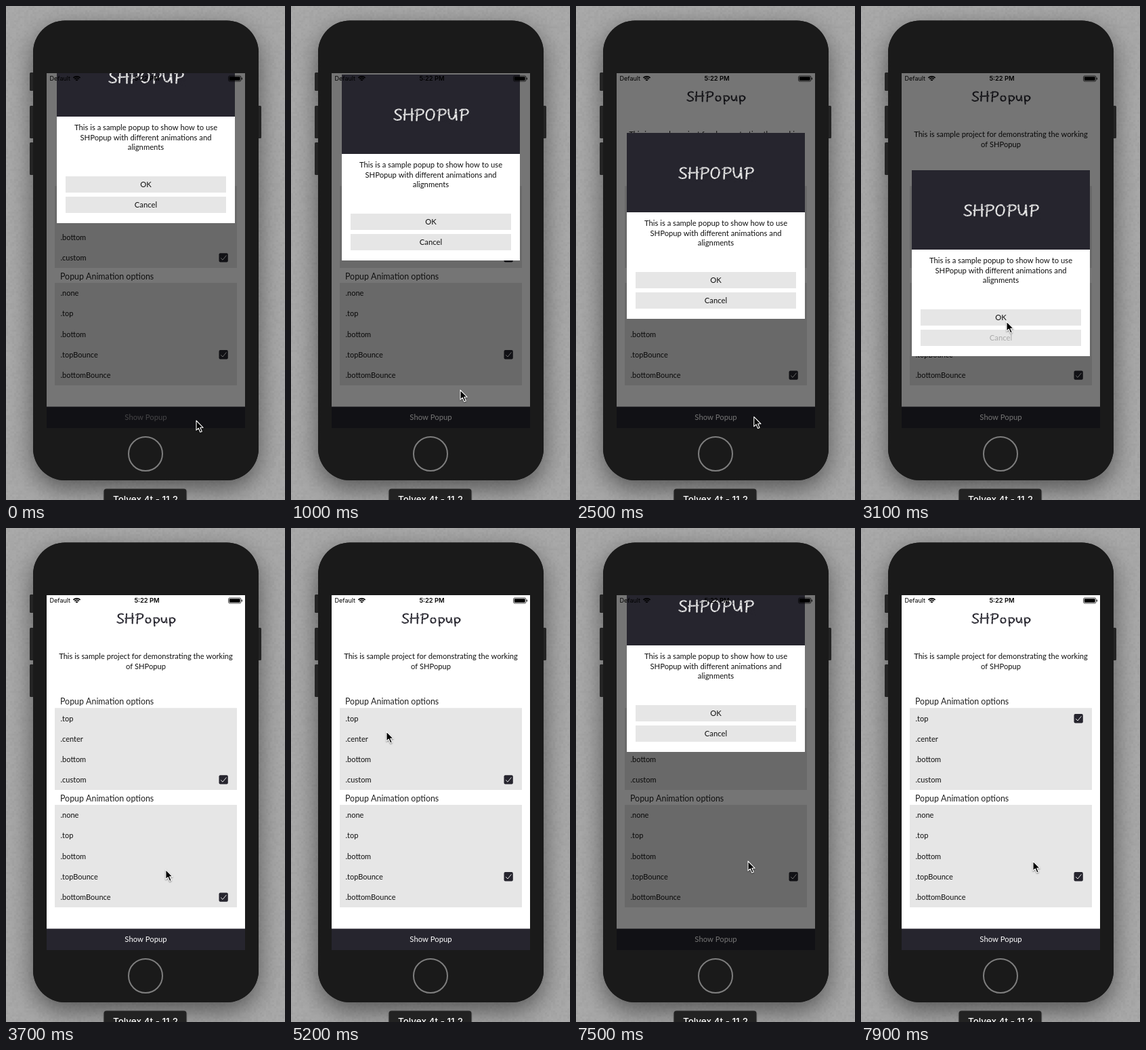
An HTML page with a canvas for the animation above (8 s loop, 412x728 px).

```html
<!DOCTYPE html>
<html lang="en">
<head>
<meta charset="utf-8">
<title>Popup demo</title>
<style>
  html, body { margin: 0; width: 100%; height: 100%; overflow: hidden; background: #a6a6a6; }
  canvas { display: block; width: 412px; height: 728px; }
</style>
</head>
<body>
<canvas id="stage" width="412" height="728"></canvas>
<script>
const W = 412, H = 728, LOOP = 8000;
const INK = '#26252e', PANEL = '#e6e6e6', BODY = '#1a1a1a';
const SCREEN = { x: 60, y: 99, w: 293, h: 523 };
const POPUP = { x: 75, w: 263, h: 274, header: 117 };
const UI = 'Lato, sans-serif', SYS = 'Inter, sans-serif';
const MIDDLE = 223, UPPER = 149;
const ABOVE = SCREEN.y - POPUP.h, BELOW = SCREEN.y + SCREEN.h;

// Each popup run: when it springs in, when it leaves, where it hides and rests.
const RUNS = [
  { show: -104, hide: 835, away: ABOVE, rest: MIDDLE },
  { show: 2200, hide: 3036, away: BELOW, rest: MIDDLE },
  { show: 6400, hide: 7340, away: ABOVE, rest: UPPER }
];

// Pointer stops: time, x, y
const STOPS = [
  [0, 281, 611], [200, 281, 611], [850, 250, 566], [1300, 250, 566],
  [1450, 251, 545], [1560, 251, 545], [2020, 265, 612], [2450, 265, 612],
  [2850, 215, 465], [3200, 215, 465], [3900, 241, 513], [4080, 241, 513],
  [4600, 280, 611], [4740, 280, 611], [5200, 141, 300], [5600, 142, 284],
  [5740, 142, 284], [6250, 274, 602], [6650, 274, 602], [7200, 254, 491], [8000, 254, 491]
];

const GLYPHS = {
  S: 'M11 2C6-1 1 3 3 7S11 11 11 15 4 21 1 17',
  H: 'M2 1L1 19M12 0L12 20M0 10L14 9',
  P: 'M3 1L2 20M0 3C7-1 13 1 12 6S6 11 3 11',
  O: 'M7 1C0 2-1 18 6 19S16 4 9 1Z',
  U: 'M1 1C0 22 12 24 12 1M12 1L13 19',
  o: 'M5 9C-1 9 0 19 5 19S11 9 5 9Z',
  u: 'M1 9C0 21 8 21 9 10M9 9L10 19',
  p: 'M1 9L2 25M1 10C7 7 12 11 9 16S4 18 2 17'
};
const STROKES = Object.fromEntries(
  Object.entries(GLYPHS).map(([key, d]) => [key, new Path2D(d)]));

const ctx = document.getElementById('stage').getContext('2d');

const clamp = v => Math.max(0, Math.min(1, v));
const ease = u => u * u * (3 - 2 * u);
const within = (t, a, b) => t >= a && t < b;

function randomizer(seed) {
  return () => (seed = (seed * 16807) % 2147483647) / 2147483647;
}

function spring(ms) {
  const zeta = 0.6, omega = 14, s = ms / 1000;
  const damped = omega * Math.sqrt(1 - zeta * zeta);
  return 1 - Math.exp(-zeta * omega * s) *
    (Math.cos(damped * s) + zeta * omega / damped * Math.sin(damped * s));
}

function box(c, x, y, w, h, fill, radius = 0) {
  c.fillStyle = fill;
  c.beginPath();
  c.roundRect(x, y, w, h, radius);
  c.fill();
}

function text(c, str, x, y, size, color, align = 'left', family = UI, weight = 400) {
  c.font = `${weight} ${size}px ${family}`;
  c.textAlign = align;
  c.textBaseline = 'alphabetic';
  c.fillStyle = color;
  c.fillText(str, x, y + size * 0.34);
}

function chalk(c, word, offsets, x, y, scale, color, ground) {
  c.save();
  c.translate(x, y);
  c.scale(scale, scale * 0.86);
  c.strokeStyle = color;
  c.lineWidth = 2.5;
  c.lineCap = c.lineJoin = 'round';
  [...word].forEach((letter, i) => {
    c.save();
    c.translate(offsets[i], 0);
    c.stroke(STROKES[letter]);
    c.restore();
  });
  const random = randomizer(77);
  c.fillStyle = ground;
  for (let i = 0; i < 420; i++) {
    c.fillRect(random() * 114 - 1, random() * 27 - 2, 0.9, 0.7);
  }
  c.restore();
}

function layer(draw) {
  const canvas = document.createElement('canvas');
  canvas.width = W;
  canvas.height = H;
  draw(canvas.getContext('2d'));
  return canvas;
}

const device = layer(c => {
  box(c, 0, 0, W, H, '#a8a8a8');
  const random = randomizer(4242);
  for (let y = 0; y < H; y += 3) {
    for (let x = 0; x < W; x += 3) {
      const shade = random() < 0.5 ? 0 : 255;
      box(c, x, y, 3, 3, `rgba(${shade},${shade},${shade},${random() * 0.025})`);
    }
  }
  c.save();
  c.shadowColor = 'rgba(0,0,0,0.5)';
  c.shadowBlur = 36;
  c.shadowOffsetY = 12;
  box(c, 40, 21.5, 333, 677.5, BODY, 47);
  c.restore();
  for (const [x, y, h] of [[35, 98, 27], [35, 147, 48], [35, 201, 48], [371, 147, 48]]) {
    box(c, x, y, 6, h, '#242424', 1.5);
  }
  box(c, 40, 21.5, 333, 677.5, BODY, 47);
  c.strokeStyle = '#7e7e7e';
  c.lineWidth = 2;
  c.beginPath();
  c.arc(206, 660, 25, 0, Math.PI * 2);
  c.stroke();
  box(c, 143.5, 710.5, 124, 40, '#777777', 5);
  box(c, 144.5, 711.5, 122, 40, '#222222', 4);
  text(c, 'Tolvex 4t - 11.2', 206, 727, 13.5, '#ffffff', 'center', SYS, 500);
});

const page = layer(c => {
  box(c, SCREEN.x, SCREEN.y, SCREEN.w, SCREEN.h, '#ffffff');
  chalk(c, 'SHPopup', [0, 15, 33, 49, 63, 76, 90], 163.5, 125.8, 0.86, INK, '#ffffff');
  text(c, 'This is sample project for demonstrating the working', 206.5, 189.5, 11.15, '#111', 'center');
  text(c, 'of SHPopup', 206.5, 204, 11.15, '#111', 'center');
  const list = (title, top, rows) => {
    text(c, title, 80, top - 9.5, 12.4, '#222');
    box(c, 72, top, 269, rows.length * 30.2, PANEL);
    rows.forEach((row, i) => text(c, row, 80.5, top + 15.5 + i * 30.2, 11, '#111'));
  };
  list('Popup Animation options', 265.3, ['.top', '.center', '.bottom', '.custom']);
  list('Popup Animation options', 408, ['.none', '.top', '.bottom', '.topBounce', '.bottomBounce']);
  box(c, SCREEN.x, 590.5, SCREEN.w, 31.5, INK);
});

const popup = layer(c => {
  box(c, 0, 0, POPUP.w, POPUP.h, '#ffffff');
  box(c, 0, 0, POPUP.w, POPUP.header, INK);
  chalk(c, 'SHPOPUP', [0, 15, 32, 47, 65, 80, 98], 76.5, 50.5, 1, '#e4e4e4', INK);
  ['This is a sample popup to show how to use',
   'SHPopup with different animations and',
   'alignments'].forEach((line, i) =>
    text(c, line, 131.5, 133.5 + i * 14.2, 11.25, '#111', 'center'));
  box(c, 13, 205, 237, 24, PANEL);
  box(c, 13, 235, 237, 24, PANEL);
  text(c, 'OK', 131.5, 217, 11.3, '#111', 'center');
});

function checkmark(y) {
  box(ctx, 314.5, y - 6.7, 13.3, 13.3, INK, 2);
  ctx.strokeStyle = '#e4e4e4';
  ctx.lineWidth = 1;
  ctx.beginPath();
  ctx.moveTo(317.2, y + 0.4);
  ctx.lineTo(320, y + 3.2);
  ctx.lineTo(325.4, y - 3.4);
  ctx.stroke();
}

function statusBar() {
  text(ctx, 'Default', 64.5, 107, 9, '#000', 'left', SYS);
  text(ctx, '5:22 PM', 208, 107, 9.3, '#000', 'center', SYS, 600);
  ctx.strokeStyle = '#000';
  ctx.lineWidth = 1.7;
  for (const r of [2, 4.6, 7.2]) {
    ctx.beginPath();
    ctx.arc(104.5, 111, r, -Math.PI * 0.75, -Math.PI * 0.25);
    ctx.stroke();
  }
  ctx.lineWidth = 0.7;
  ctx.beginPath();
  ctx.roundRect(328.5, 103, 18.5, 8, 2);
  ctx.stroke();
  box(ctx, 329.7, 104.2, 16, 5.6, '#000', 1);
  box(ctx, 347.8, 105.5, 1.1, 3, '#000', 0.5);
}

function pointer(t) {
  const i = Math.max(1, STOPS.findIndex(stop => stop[0] > t));
  const [t0, x0, y0] = STOPS[i - 1], [t1, x1, y1] = STOPS[i];
  const u = ease(clamp((t - t0) / (t1 - t0)));
  ctx.save();
  ctx.translate(x0 + (x1 - x0) * u, y0 + (y1 - y0) * u);
  ctx.fillStyle = '#000';
  ctx.strokeStyle = '#fff';
  ctx.lineWidth = 1.1;
  ctx.lineJoin = 'round';
  const arrow = new Path2D('M0 0V14.2L3.3 11.2L5.8 17L8.3 16L5.8 10.3H10.2Z');
  ctx.shadowColor = 'rgba(0,0,0,0.35)';
  ctx.shadowBlur = 2;
  ctx.shadowOffsetY = 1;
  ctx.fill(arrow);
  ctx.stroke(arrow);
  ctx.restore();
}

// The button label dims on touch and fades back as its popup arrives.
function showButton(t) {
  const run = RUNS.find(r => within(t, r.show - 150, r.show + 400));
  const alpha = run ? 0.25 + 0.75 * clamp((t - run.show) / 300) : 1;
  text(ctx, 'Show Popup', 206.5, 606.5, 11.3, `rgba(255,255,255,${alpha})`, 'center');
}

function drawPopup(t) {
  const run = RUNS.find(r => within(t, r.show, r.hide + 500));
  if (!run) return;
  const dim = clamp((t - run.show) / 100) * (1 - clamp((t - run.hide - 250) / 250));
  box(ctx, SCREEN.x, SCREEN.y, SCREEN.w, SCREEN.h, `rgba(0,0,0,${0.54 * dim})`);
  const leave = clamp((t - run.hide) / 300) ** 2;
  const shown = t < run.hide ? spring(t - run.show) : 1 - leave;
  const y = Math.round(run.away + (run.rest - run.away) * shown);
  ctx.drawImage(popup, POPUP.x, y);
  const pressed = within(t, 2950, 3200);
  text(ctx, 'Cancel', POPUP.x + 131.5, y + 247, 11.3, pressed ? '#ababab' : '#111', 'center');
}

function draw(t) {
  ctx.drawImage(device, 0, 0);
  ctx.save();
  ctx.beginPath();
  ctx.rect(SCREEN.x, SCREEN.y, SCREEN.w, SCREEN.h);
  ctx.clip();
  ctx.drawImage(page, 0, 0);
  checkmark(t < 5750 ? 371 : 280.8);
  checkmark(within(t, 1560, 4080) ? 544.2 : 513.8);
  showButton(t);
  drawPopup(t);
  statusBar();
  ctx.restore();
  pointer(t);
}

const start = performance.now();
function tick() {
  draw((performance.now() - start) % LOOP);
  requestAnimationFrame(tick);
}
tick();
</script>
</body>
</html>
```
